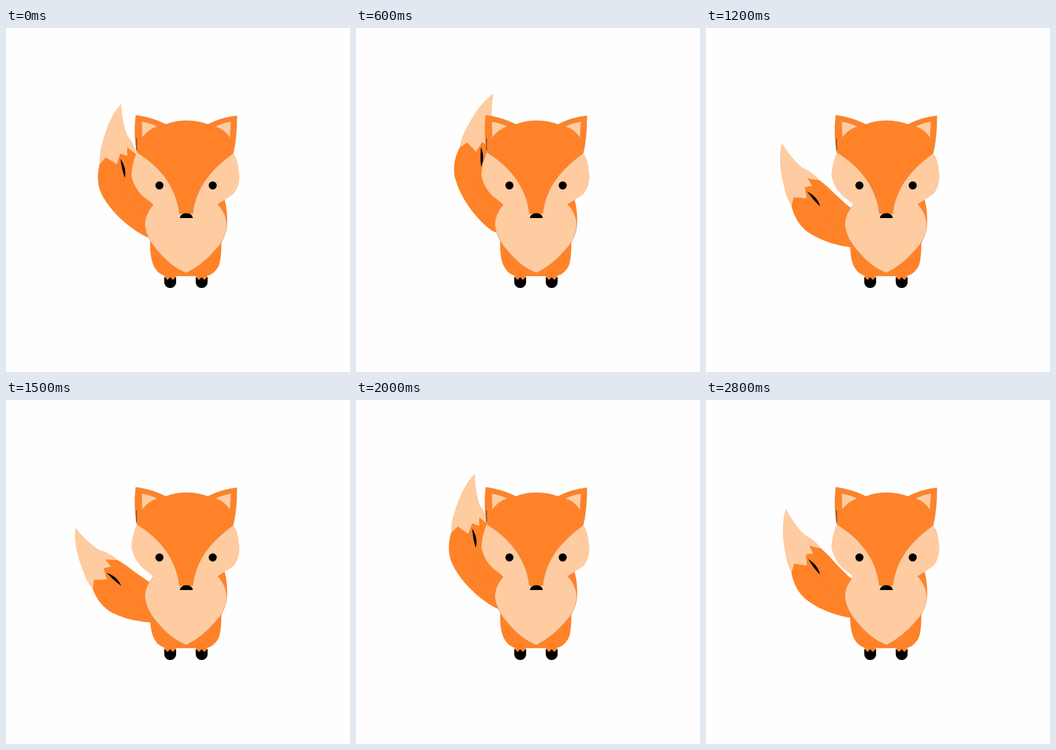
Recreate the animation shown at these times as an HTML page. Size 639 px wide and 639 px high, loop 2900 ms.

```html
<!DOCTYPE html>
<html lang="en">
<head>
<meta charset="utf-8">
<title>Fox wagging its tail</title>
<style>
  html, body { margin: 0; height: 100%; overflow: hidden; background: #fefefe; }
  svg { display: block; width: 100vw; height: 100vh; }
  .orange { fill: #ff8228; }
  .cream { fill: #ffcba1; }
  .edge { stroke: #d99a68; stroke-width: .8; }
  .hair { fill: none; stroke: #dc8542; stroke-width: .8; }
</style>
</head>
<body>
<svg viewBox="0 0 639 639">
  <g id="tail">
    <path class="orange" d="M161 351L163 334L187 333L181 313L194 309L184 296L207 297Q224 307 240 320L266 338L290 350L335 385L327 403L319 409Q300 415 266 413Q225 410 195 394Q172 380 161 351Z"/>
    <path class="cream" d="M129 237Q148 262 172 278Q192 283 207 297L184 296L194 309L181 313L187 333L163 334L161 351Q149 336 144 320Q124 270 129 237Z"/>
    <path class="hair" d="M187 321Q205 342 245 380Q266 382 289 374"/>
    <path d="M187 321Q207 328 214 345Q203 338 187 321Z"/>
  </g>

  <!-- body -->
  <path class="orange" d="M268 390Q266 432 278 448Q285 458 297 461H371Q384 459 392 447Q400 438 400 400L410 372Q413 345 406 318L330 310Z"/>
  <path class="cream edge" d="M274 328Q258 346 258 366Q261 391 281 413Q306 444 335 455Q365 440 387 414Q409 392 410 366Q409 343 392 326Z"/>

  <!-- head -->
  <path class="cream" d="M243 231Q233 256 233 274Q238 298 256 314Q268 322 275 330L335 352L390 329Q412 316 423 308Q436 290 433 270Q431 242 422 233Z"/>
  <path class="orange edge" d="M241 162Q272 166 297 179Q315 172 335 172Q356 172 375 179Q400 166 429 163Q429 204 422 233C382 262 353 295 347 345H322C316 294 285 257 243 231Q237 200 241 162Z"/>
  <path d="M242.500 205V227" stroke="#5d4a45" stroke-width="1.500"/>
  <path class="cream edge" d="M252 174Q268 176 281 183Q263 189 253 204Z"/>
  <path class="cream edge" d="M418 174Q402 176 389 183Q407 189 416 204Z"/>
  <circle cx="285" cy="292.500" r="7.500"/>
  <circle cx="384" cy="292.500" r="7.500"/>
  <path d="M323 353C324 341 346 341 347 353Z"/>

  <!-- feet -->
  <g id="foot">
    <path class="orange" d="M295 460H315V469H295Z"/>
    <path d="M294 462L300 468L305 463L310 468L316 462V472A11 11 0 0 1 294 472Z"/>
  </g>
  <use href="#foot" x="58.500"/>
</svg>
<script>
  const LOOP = 2900, STEP = 100, DRAWN_ANGLE = 66.2;

  // [time in ms, tail lean from vertical in degrees]
  const swing = [
    [0, 30.8], [400, 4], [600, 18.4], [1000, 44.4], [1200, 59], [1400, 76.5],
    [1500, 66.2], [1800, 42], [2000, 28.6], [2300, 5], [2400, 14.6], [2800, 55.3]
  ];
  const tail = document.getElementById('tail');

  function leanAt(time) {
    const next = swing.findIndex(([t]) => t > time);
    if (next < 0) return swing[swing.length - 1][1];
    const [t0, a0] = swing[next - 1], [t1, a1] = swing[next];
    return a0 + (a1 - a0) * (time - t0) / (t1 - t0);
  }

  const start = performance.now();
  function draw() {
    const time = (performance.now() - start) % LOOP;
    const lean = leanAt(Math.floor(time / STEP) * STEP);
    tail.setAttribute('transform', `rotate(${DRAWN_ANGLE - lean} 322 322)`);
    requestAnimationFrame(draw);
  }
  draw();
</script>
</body>
</html>
```
